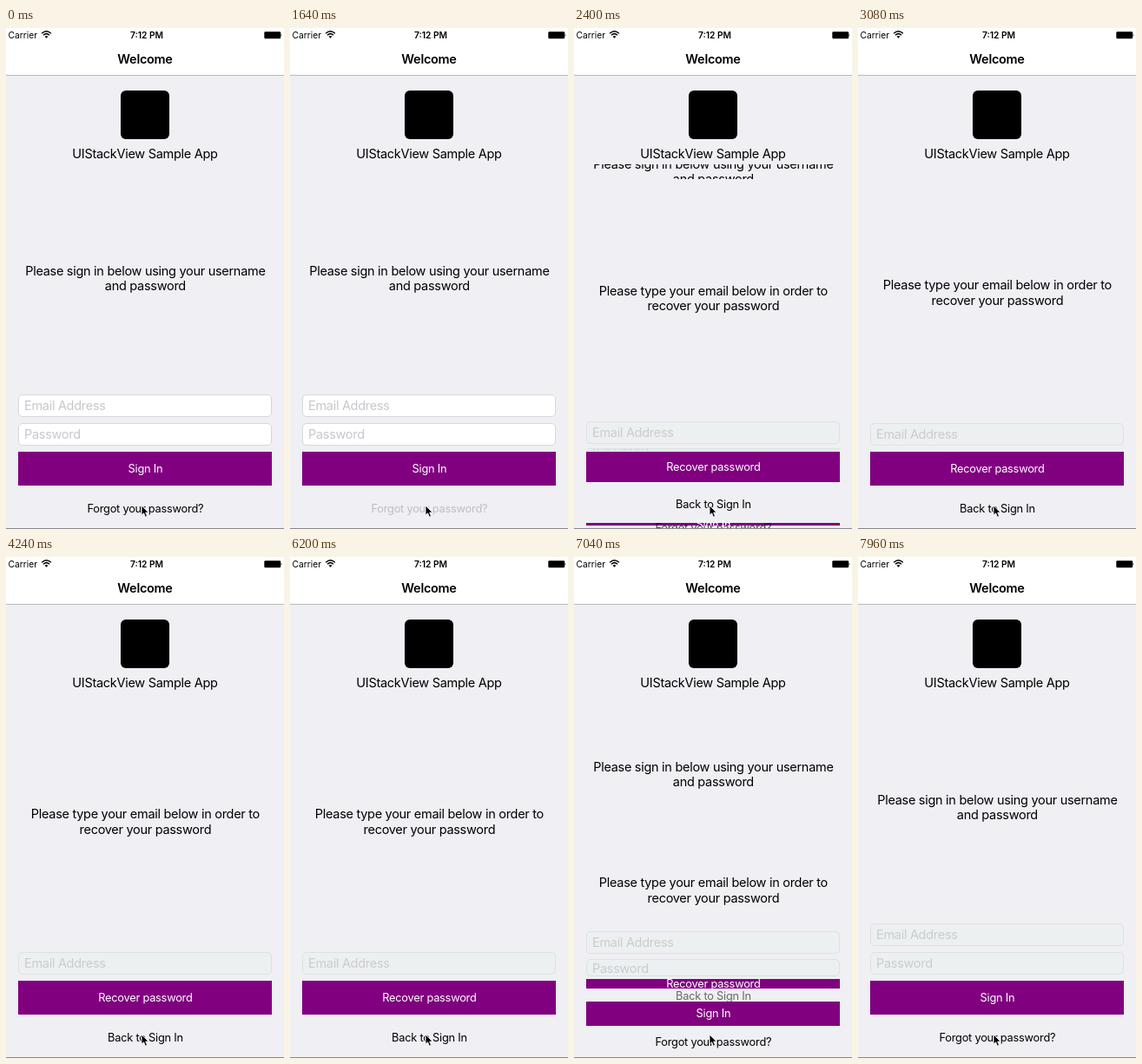
An HTML page for the animation above (8000 ms loop, 320x577 px).

```html
<!DOCTYPE html>
<html lang="en">
<head>
<meta charset="utf-8">
<title>Welcome</title>
<style>
/* --p: 0 = sign-in form, 1 = recovery form */
@property --p { syntax: "<number>"; inherits: true; initial-value: 0; }
@property --a { syntax: "<number>"; inherits: false; initial-value: 1; }

html, body { margin: 0; width: 100%; height: 100%; overflow: hidden; }
body {
  position: relative;
  background: #efeff4;
  color: #000;
  font: 14.5px/17.2px Inter, Roboto, sans-serif;
  letter-spacing: -.02em;
}
body * { position: absolute; box-sizing: border-box; }
svg * { position: static; }

.bar {
  left: 0; top: 0; width: 100%; height: 55px;
  background: #fff;
  border-bottom: 1px solid #b9b9bc;
}
.status { font-size: 10.24px; line-height: 16px; letter-spacing: 0; top: 0; white-space: nowrap; }
.carrier { left: 2.6px; }
.clock { left: 2px; width: 320px; text-align: center; font-weight: 600; }
.heading { left: 0; top: 27px; width: 320px; text-align: center; font-weight: 600; }
.icon { left: 132px; top: 72px; width: 56px; height: 56px; border-radius: 6px; background: #000; }
.name { left: 0; top: 136px; width: 320px; text-align: center; }
.edge { left: 0; bottom: 0; width: 100%; height: 1px; background: #85858a; }

.form {
  --q: calc(1 - var(--p));
  --bow: calc(var(--p) * var(--q));
  --email: calc(422px + 33px * var(--p) - 3px * var(--bow));
  --recover: calc(488.3px - 12px * var(--bow));
  --back: calc(var(--recover) + 38.4px * var(--p));
  --signin: calc(var(--back) + 50px * var(--p) + 4px * var(--bow));
  --forgot: calc(var(--signin) + 38.4px * var(--q));
  inset: 0;
  overflow: hidden;
  animation: swap 8s infinite;
}
@keyframes swap {
  0%, 24.88% { --p: 0; animation-timing-function: ease-in-out; }
  31.13%, 84.1% { --p: 1; animation-timing-function: ease-in-out; }
  90.35%, 100% { --p: 0; }
}

.row {
  left: 14.4px; width: 292px;
  display: flex; align-items: center; justify-content: center;
  text-align: center; white-space: nowrap;
}
.row span { position: static; flex: none; }

.msg { overflow: hidden; }
.ask { top: 156.6px; height: calc(263px * var(--q)); }
.hint {
  top: calc(156.6px + 263px * var(--q) - 12px * var(--bow));
  height: calc(296px * var(--p));
}

.field {
  justify-content: flex-start;
  padding-left: 5.6px;
  overflow: hidden;
  border: 1px solid;
  border-radius: 5px;
  animation: tint 8s infinite step-end;
}
@keyframes tint {
  0% { background: #fff; border-color: #d8d8dc; color: #c7c7cd; }
  24.5%, 100% { background: #edf0f0; border-color: #dee1e1; color: #cacdcc; }
}
.email { top: var(--email); height: 26px; }
.pass {
  top: calc(var(--email) + 33px - 2px * var(--p));
  height: calc(26px * pow(var(--q), .75));
  opacity: calc(var(--q) * 30);
}

.btn { background: #800080; color: #fff; }
.btn, .link { font-size: 12.8px; letter-spacing: -.018em; }
.link { padding-top: 2.5px; }
.recover { top: var(--recover); height: calc(38.4px * var(--p)); opacity: calc(var(--p) * 30); }
.signin { top: var(--signin); height: calc(38.4px * var(--q)); opacity: calc(var(--q) * 30); }
.back {
  top: var(--back); height: calc(51px * var(--p) + 4px * var(--bow));
  opacity: calc(var(--a) * min(1, var(--p) * 30));
  animation: tapBack 8s infinite linear;
}
.forgot {
  top: var(--forgot); height: calc(51px * var(--q));
  opacity: calc(var(--a) * min(1, var(--q) * 30));
  animation: tapForgot 8s infinite linear;
}
/* press dims at once, release fades back */
@keyframes tapForgot {
  0%, 18% { --a: 1; }
  18.01%, 24.75% { --a: .2; }
  33.5%, 100% { --a: 1; }
}
@keyframes tapBack {
  0%, 81% { --a: 1; }
  81.01%, 84.1% { --a: .2; }
  92.85%, 100% { --a: 1; }
}
</style>
</head>
<body>
<div class="form">
  <div class="row msg ask"><span>Please sign in below using your username<br>and password</span></div>
  <div class="row msg hint"><span>Please type your email below in order to<br>recover your password</span></div>
  <div class="row field email"><span>Email Address</span></div>
  <div class="row field pass"><span>Password</span></div>
  <div class="row btn recover"><span>Recover password</span></div>
  <div class="row link back"><span>Back to Sign In</span></div>
  <div class="row btn signin"><span>Sign In</span></div>
  <div class="row link forgot"><span>Forgot your password?</span></div>
</div>

<div class="bar">
  <div class="status carrier">Carrier</div>
  <svg style="left:40px;top:2px" width="13" height="11" viewBox="0 0 13 11" fill="none" stroke="#000" stroke-width="1.5">
    <path d="M1.2 4.2Q6.5-.6 11.8 4.2M3 6.2Q6.5 3 10 6.2"/>
    <path d="M6.5 9.8 4.5 7.8Q6.5 6.2 8.5 7.8Z" fill="#000" stroke="none"/>
  </svg>
  <div class="status clock">7:12 PM</div>
  <svg style="left:297px;top:4px" width="22" height="9" viewBox="0 0 22 9">
    <rect x=".3" y=".2" width="18.9" height="8.1" rx="1.2"/>
    <path d="M19.6 2.8Q21.4 4.3 19.6 5.8Z"/>
  </svg>
  <div class="heading">Welcome</div>
</div>

<div class="icon"></div>
<div class="name">UIStackView Sample App</div>
<div class="edge"></div>

<svg style="left:155px;top:549px" width="12" height="17" viewBox="0 0 12 17">
  <path d="M1 1V12.2L3.6 9.8 5.4 14.2 7.5 13.3 5.7 9.1H9.2Z" fill="#000" stroke="#fff" stroke-width=".9"/>
</svg>
</body>
</html>
```
